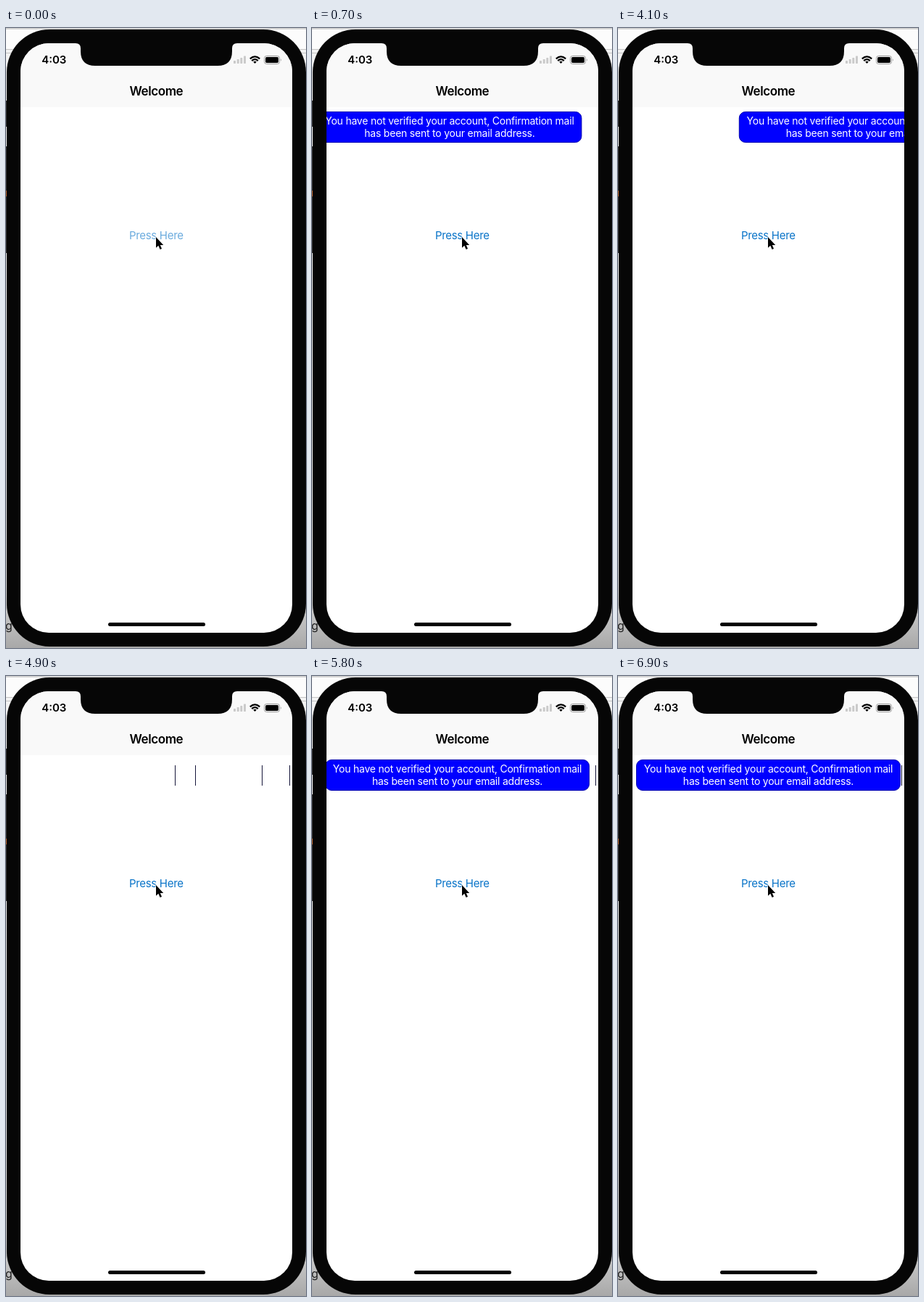
Recreate the animation shown at these times as an HTML page. Size 414x854 px, loop 8 s.

```html
<!DOCTYPE html>
<html lang="en">
<head>
<meta charset="utf-8">
<title>Welcome banner</title>
<style>
html, body { margin: 0; width: 100%; height: 100%; overflow: hidden; background: #fff; }
svg { display: block; width: 414px; height: 854px; font-family: Inter, Roboto, sans-serif; }
.bold { font-weight: 600; fill: #000; }
.note { font-size: 14px; letter-spacing: -.22px; fill: #fff; }
text { text-anchor: middle; }
</style>
</head>
<body>
<svg viewBox="0 0 414 854">
  <defs>
    <linearGradient id="shade" x1="0" y1="0" x2="0" y2="1">
      <stop offset="0" stop-color="#f4f4f4"/>
      <stop offset=".9" stop-color="#dedede"/>
      <stop offset="1" stop-color="#a8a8a8"/>
    </linearGradient>
    <clipPath id="screen"><rect x="20" y="21" width="375" height="812" rx="39"/></clipPath>
  </defs>

  <!-- desktop behind the phone -->
  <rect width="414" height="854" fill="url(#shade)"/>
  <rect width="414" height="2" fill="#d4d4d4"/>
  <rect y="2" width="414" height="27" fill="#fcfcfc"/>
  <path d="M0 29.5H414M0 34.5H414" stroke="#c4c4c4"/>
  <path d="M0 100h2v36h-2zM0 163h2v147h-2z" fill="#2b2b2d"/>
  <path d="M413 163h1v130h-1z" fill="#2b2b2d"/>
  <rect y="224" width="1" height="8" fill="#b5622e"/>
  <text x="4" y="829" font-size="16" fill="#222">g</text>

  <!-- phone -->
  <rect x="1" y="2" width="413" height="850" rx="59" fill="#060606"/>
  <g clip-path="url(#screen)">
    <rect x="20" y="21" width="375" height="812" fill="#fff"/>
    <rect x="20" y="21" width="375" height="88" fill="#f9f9f9"/>
    <g id="trails" fill="#16163a"></g>
    <g id="banner">
      <rect x="25.5" y="115.5" width="364" height="42" rx="8.5" fill="#00f" stroke="#0000b0"/>
      <text class="note" x="207.5" y="133">You have not verified your account, Confirmation mail</text>
      <text class="note" x="207.5" y="150">has been sent to your email address.</text>
    </g>
  </g>
  <path d="M96 20H319V21Q312 21 312 28V32Q312 52 292 52H123Q103 52 103 32V28Q103 21 96 21Z" fill="#060606"/>

  <!-- status bar -->
  <text class="bold" x="66.3" y="49" font-size="15">4:03</text>
  <g fill="#cacaca">
    <rect x="314" y="45" width="3" height="4" rx=".7"/>
    <rect x="318.7" y="43" width="3" height="6" rx=".7"/>
    <rect x="323.3" y="41" width="3" height="8" rx=".7"/>
    <rect x="328" y="38.5" width="3" height="10.5" rx=".7"/>
  </g>
  <g fill="none" stroke="#000" stroke-width="2.2">
    <path d="M336.8 42.4Q343.5 36.3 350.2 42.4"/>
    <path d="M339.2 45.1Q343.5 41.2 347.8 45.1"/>
    <path d="M341.2 46.6Q343.5 44.8 345.8 46.6L343.5 49Z" fill="#000" stroke="none"/>
  </g>
  <rect x="356.5" y="38.5" width="21" height="11" rx="3" fill="none" stroke="#999"/>
  <rect x="358" y="40" width="18" height="8" rx="1.7"/>
  <path d="M379 42.2q1.6 1.8 0 3.6z" fill="#888"/>

  <text class="bold" x="207.3" y="93" font-size="17" letter-spacing="-.4">Welcome</text>
  <text id="press" x="207.3" y="291" font-size="15" letter-spacing="-.3" fill="#0873c8">Press Here</text>
  <path d="M207 288V302.8L210.3 299.7L212.6 305L215 304L212.8 298.9H217.2Z" stroke="#fff" stroke-width="1.2" paint-order="stroke"/>
  <rect x="141" y="819" width="134" height="5" rx="2.5"/>
</svg>
<script>
const LOOP = 8000, TRAVEL = 375, LEFT = 25;
const ENTER = 840, EXIT = 280;
const ENTER_A = 4, EXIT_A = 4030, ENTER_B = 5048;
const banner = document.getElementById('banner');
const press = document.getElementById('press');
const clamp = v => Math.min(1, Math.max(0, v));

// cubic-bezier(0, 0, .58, 1)
function easeOut(p) {
  if (p <= 0 || p >= 1) return clamp(p);
  let lo = 0, hi = 1;
  for (let i = 0; i < 24; i++) {
    const u = (lo + hi) / 2;
    if (1.74 * u * u - .74 * u * u * u < p) lo = u; else hi = u;
  }
  return 3 * lo * lo - 2 * lo * lo * lo;
}

function shift(t) {
  if (t >= ENTER_B) return TRAVEL * (easeOut((t - ENTER_B) / ENTER) - 1);
  if (t >= EXIT_A) return TRAVEL * easeOut((t - EXIT_A) / EXIT);
  return TRAVEL * (easeOut((t - ENTER_A) / ENTER) - 1);
}

function pressAlpha(t) {
  if (t < 4940) return .6 + .4 * clamp(t / 200);
  return .2 + .8 * clamp((t - 4960) / 300);
}

// thin marks the banner's edge leaves behind as it slides out
const trails = [233, 261, 353, 391].map(x => {
  const r = document.createElementNS('http://www.w3.org/2000/svg', 'rect');
  const box = { x, y: 123, width: 1, height: 28 };
  for (const k in box) r.setAttribute(k, box[k]);
  document.getElementById('trails').append(r);
  return { x, r };
});

function draw(t) {
  const dx = shift(t);
  banner.setAttribute('transform', `translate(${dx.toFixed(2)} 0)`);
  press.setAttribute('opacity', pressAlpha(t).toFixed(3));
  for (const { x, r } of trails) {
    const on = t >= EXIT_A + EXIT || (t >= EXIT_A && LEFT + dx > x);
    r.setAttribute('visibility', on ? 'visible' : 'hidden');
  }
}

let start;
function tick(now) {
  if (start === undefined) start = now;
  draw((now - start) % LOOP);
  requestAnimationFrame(tick);
}
draw(0);
requestAnimationFrame(tick);
</script>
</body>
</html>
```
